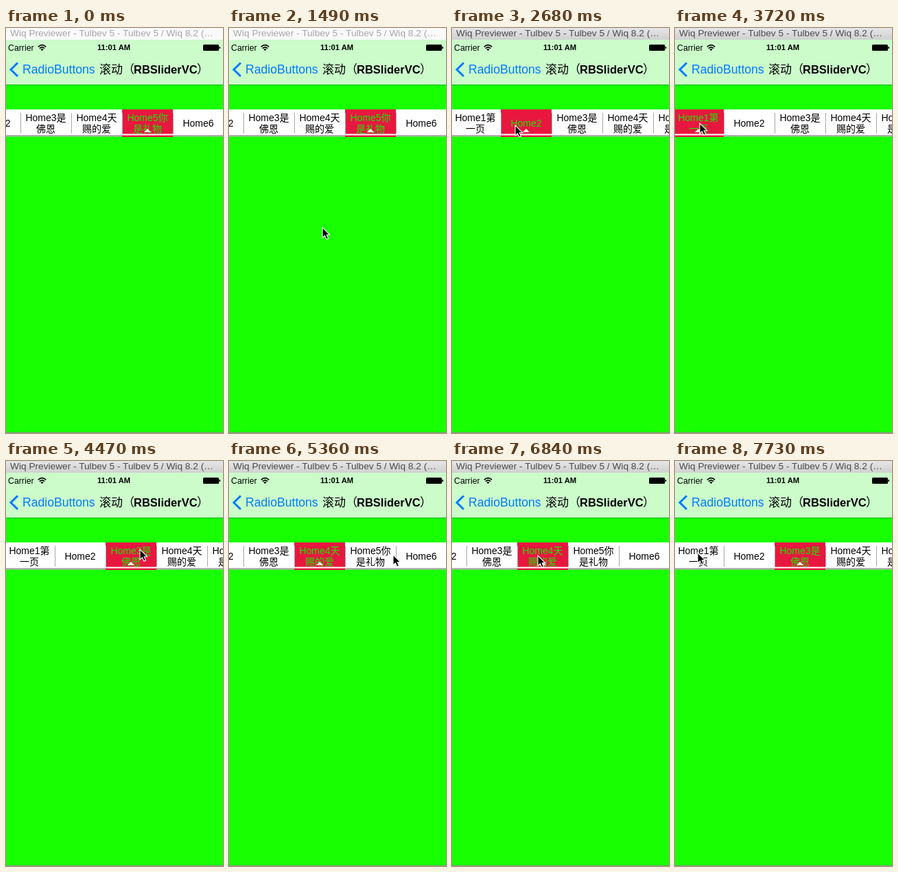
Write an HTML page that moves like this. It is 316 px wide and 587 px high and loops after 8000 ms.

```html
<!DOCTYPE html>
<html lang="zh">
<head>
<meta charset="utf-8">
<style>
html, body { margin: 0; width: 100%; height: 100%; overflow: hidden; background: #17ff00; }
svg { display: block; width: 316px; height: 587px; font-family: "Liberation Sans", "Noto Sans CJK SC", "Noto Sans CJK", sans-serif; }
.tab text { font-size: 14px; font-weight: 300; text-anchor: middle; fill: #000; }
.tab .fill, .tab .mark { visibility: hidden; }
.tab.on .fill, .tab.on .mark { visibility: visible; }
.tab.on text { fill: #17e800; }
</style>
</head>
<body>
<svg viewBox="0 0 316 587">
  <defs>
    <linearGradient id="chrome" x1="0" y1="0" x2="0" y2="1">
      <stop offset="0" stop-color="#e6e6e6"/><stop offset="1" stop-color="#d0d0d0"/>
    </linearGradient>
  </defs>
  <rect width="316" height="587" fill="#17ff00"/>
  <rect y="586" width="316" height="1" fill="#8a8f8a"/>

  <rect id="bar" width="316" height="17"/>
  <text id="caption" x="6" y="12" font-size="13.7">Wiq Previewer - Tulbev 5 - Tulbev 5 / Wiq 8.2 (…</text>

  <rect y="17" width="316" height="65" fill="#cbfcca"/>
  <rect y="82" width="316" height="1" fill="#10b200"/>
  <text x="3" y="32.5" font-size="12.3">Carrier</text>
  <g fill="none" stroke="#000" stroke-width="1.7">
    <path d="M46.8 27.3Q52.5 22 58.2 27.3M48.9 29.6Q52.5 26.2 56.1 29.6"/>
    <path d="M50.4 30.9Q52.5 29 54.6 30.9L52.5 33Z" fill="#000" stroke="none"/>
  </g>
  <text x="157" y="32" font-size="11.2" font-weight="bold" text-anchor="middle">11:01 AM</text>
  <rect x="287" y="24" width="23" height="9" rx="1.5"/>
  <rect x="310.5" y="27" width="1.5" height="3"/>
  <path d="M17 50.5L7 60.3L17 70" fill="none" stroke="#007aff" stroke-width="3"/>
  <text x="24" y="66" font-size="17.6" fill="#007aff">RadioButtons</text>
  <text x="136" y="66" font-size="17" font-weight="500">滚动（</text>
  <text x="186" y="66" font-size="16.5" font-weight="bold">RBSliderVC</text>
  <text x="278" y="66" font-size="17" font-weight="500">）</text>

  <rect y="118" width="316" height="37" fill="#fff"/>
  <rect y="155" width="316" height="2.5" fill="#b0b0b0"/>
  <g id="tabs"></g>
  <path id="cursor" d="M0 0V15L3.5 11.8L5.9 17.2L8.5 16.1L6.2 10.8H10.8Z" fill="#000" stroke="#fff" stroke-width="1.1"/>
</svg>
<script>
const LOOP = 8000, TICK = 148.6, TAB = 74, LEFT = -3;
const labels = [["Home1第", "一页"], ["Home2"], ["Home3是", "佛恩"], ["Home4天", "赐的爱"], ["Home5你", "是礼物"], ["Home6"]];

// Pointer moves, in ticks; a tab is pressed on arrival
const moves = [
  { from: 10, to: 15, x: 10, y: 140, tab: 2 },
  { from: 16, to: 18, x: 92, y: 141 },
  { from: 19, to: 24, x: 36, y: 138, tab: 1 },
  { from: 26, to: 30, x: 195, y: 128, tab: 3 },
  { from: 30, to: 33, x: 239, y: 136, tab: 4 },
  { from: 37, to: 40, x: 252, y: 137, tab: 6 },
  { from: 42, to: 44, x: 125, y: 137 },
  { from: 44, to: 46, x: 125, y: 137, tab: 4 },
  { from: 46, to: 49, x: 33, y: 133, tab: 3 }
];
const ENTER = 10, SCROLL_TICKS = 3, MAX_SCROLL = 124;

const $ = id => document.getElementById(id);
const mix = (a, b, p) => a + (b - a) * p;
const progress = (t, from, to) => {
  const p = Math.min(1, Math.max(0, (t - from) / (to - from)));
  return p * p * (3 - 2 * p);
};
const place = (el, x, y) => el.setAttribute("transform", `translate(${x} ${y})`);
// The first three tabs rest at the left end, the others at the right
const restScroll = tab => tab > 3 ? MAX_SCROLL : 0;

function stateAt(tick) {
  let x = 136, y = 289, tab = 5, scroll = restScroll(tab), active = false;
  for (const m of moves) {
    const p = progress(tick, m.from, m.to);
    x = mix(x, m.x, p);
    y = mix(y, m.y, p);
    if (m.tab && tick >= m.to) {
      tab = m.tab;
      active = true;
      scroll = mix(scroll, restScroll(tab), progress(tick, m.to, m.to + SCROLL_TICKS));
    }
  }
  return { x, y, tab, scroll, active };
}

$("tabs").innerHTML = labels.map((lines, i) => {
  const first = lines.length > 1 ? 135 : 143;
  const text = lines.map((s, n) => `<text x="37" y="${first + n * 16}">${s}</text>`).join("");
  return `<g class="tab" transform="translate(${LEFT + i * TAB} 0)">
    <g class="fill"><rect y="118" width="${TAB}" height="40" fill="#e8173f"/>
    <rect y="153.5" width="${TAB}" height="2" fill="#fff"/></g>
    <rect y="123" width="1" height="30" fill="#a8a8a8"/>
    ${text}<path class="mark" d="M32 151L37 146L42 151Z" fill="#fff"/></g>`;
}).join("");
const tabs = [...document.querySelectorAll(".tab")];

function draw(tick) {
  const s = stateAt(tick);
  $("bar").setAttribute("fill", s.active ? "url(#chrome)" : "#fafafa");
  $("caption").setAttribute("fill", s.active ? "#4a4a4a" : "#a6a6a6");
  tabs.forEach((tab, i) => tab.classList.toggle("on", i + 1 === s.tab));
  place($("tabs"), -s.scroll, 0);
  place($("cursor"), s.x, s.y);
  $("cursor").style.visibility = tick < ENTER ? "hidden" : "visible";
}

const start = performance.now();
function frame() {
  const t = (performance.now() - start) % LOOP;
  draw(Math.floor(t / TICK));
  requestAnimationFrame(frame);
}
frame();
</script>
</body>
</html>
```
